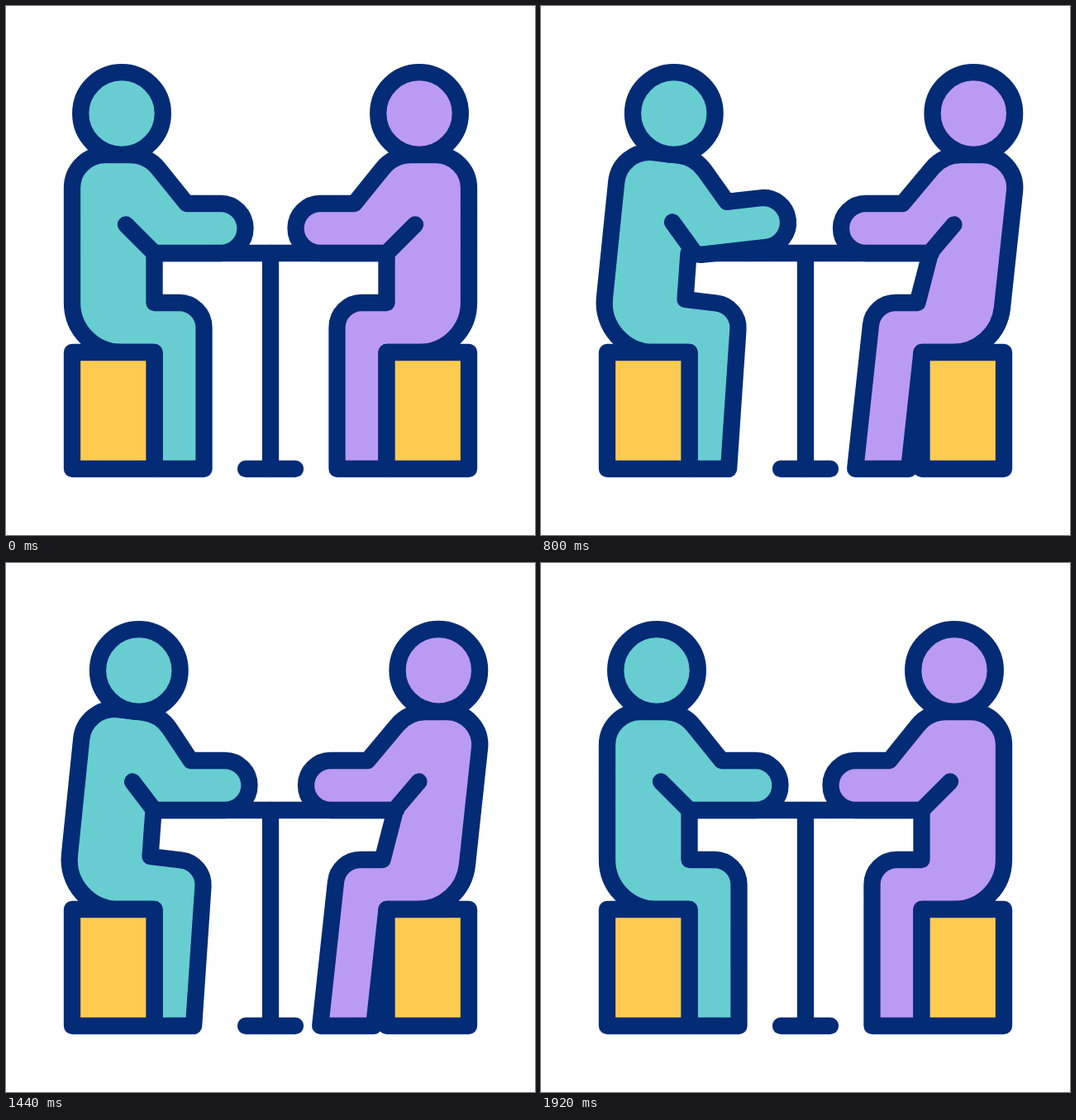
An HTML page with a canvas for the animation above (2000 ms loop, 640 by 640 pixels).

```html
<!DOCTYPE html>
<html lang="en">
<head>
<meta charset="utf-8">
<title>Table talk</title>
<style>
html, body { margin: 0; width: 100%; height: 100%; overflow: hidden; background: #fff; }
canvas { display: block; width: 640px; height: 640px; }
</style>
</head>
<body>
<canvas id="stage"></canvas>
<script>
const SIZE = 640, LOOP = 2000, STEP = 40;
const NAVY = '#032b76', TEAL = '#67cdd1', LILAC = '#bb9af3', YELLOW = '#fecb50';

// Key lines of a sitter facing right
const BACK = 80, FRONT = 179.5, KNEE = 239.5;
const TOP = 180, DESK = 299, LAP = 359, SEAT = 419, FLOOR = 560;
const HAND = 30;

// How far each part moves in a full lean: slopes for lean, tilt and swing, pixels for the rest
const FORWARD = { lean: 0.105, pivot: 326, tilt: 0.115, swing: -0.066,
                  reach: 5, stretch: 0, waist: -1, lap: -5, elbow: 8 };
const RECLINE = { lean: -0.107, pivot: 346, tilt: 0, swing: 0.108,
                  reach: -12.5, stretch: 3.5, waist: -10.5, lap: 5, elbow: -4.5 };

const canvas = document.getElementById('stage');
const ctx = canvas.getContext('2d');
const dpr = window.devicePixelRatio || 1;
canvas.width = canvas.height = SIZE * dpr;

const clamp = u => Math.min(1, Math.max(0, u));
const ease = (t, from, to) => (1 - Math.cos(Math.PI * clamp((t - from) / (to - from)))) / 2;

function paint(fill) {
  ctx.fillStyle = fill;
  ctx.fill();
  ctx.stroke();
}

function line(...points) {
  ctx.beginPath();
  points.forEach(([x, y]) => ctx.lineTo(x, y));
  ctx.stroke();
}

// Closed outline of [x, y, radius] corners
function outline(points) {
  const [a, z] = [points[0], points[points.length - 1]];
  const mid = [(a[0] + z[0]) / 2, (a[1] + z[1]) / 2];
  ctx.beginPath();
  ctx.moveTo(...mid);
  points.forEach(([x, y, r], i) => {
    const [nx, ny] = points[i + 1] || mid;
    if (r) ctx.arcTo(x, y, nx, ny, r);
    else ctx.lineTo(x, y);
  });
  ctx.closePath();
}

// k: amount of the move, lift: raised forearm, nod: head offset
function sitter(move, k, color, lift = 0, nod = 0) {
  const shear = y => k * move.lean * (move.pivot - y);
  const torso = (x, y, r) => [x + shear(y), y + k * move.tilt * (x - 145), r];
  const thigh = (x, dx) => [x + dx, LAP + k * move.tilt * 1.15 * (x - 210)];
  const leg = (x, y) => x + k * move.swing * (y - 372);

  // Points along and across the forearm, measured from the palm
  const angle = -0.115 * lift;
  const [ux, uy] = [Math.cos(angle), Math.sin(angle)];
  const palm = [259.5 + k * move.reach + 4.5 * lift, 269 - 7 * lift];
  const arm = (along, side, r) => [
    palm[0] + ux * along + uy * HAND * side,
    palm[1] + uy * along - ux * HAND * side, r
  ];
  const waist = FRONT + k * move.waist;
  const calf = move.swing > 0 ? leg(FRONT, FLOOR) - 5 * k : FRONT;

  outline([
    torso(BACK, TOP, 40),
    torso(171, TOP, 45),
    arm(-41 - k * move.stretch, 1),
    arm(HAND, 1, HAND - 0.1),
    arm(HAND, -1, HAND - 0.1),
    arm(-79, -1),
    [waist, DESK],
    thigh(FRONT, k * move.lap),
    [...thigh(KNEE, leg(KNEE, LAP) - KNEE), 30],
    [leg(KNEE, FLOOR), FLOOR],
    [calf, FLOOR],
    [FRONT, SEAT],
    [BACK + shear(SEAT), SEAT, 60]
  ]);
  paint(color);
  line([waist + 7 * lift, DESK - k], [145 + k * move.elbow + 6 * lift, 264.5 - 3 * lift]);

  ctx.beginPath();
  ctx.arc(140 + shear(128), 130 + nod, 49.8, 0, Math.PI * 2);
  paint(color);

  ctx.beginPath();
  ctx.rect(BACK, SEAT, FRONT - BACK, FLOOR - SEAT);
  paint(YELLOW);
}

function table() {
  line([FRONT, DESK], [SIZE - FRONT, DESK]);
  line([320, DESK], [320, FLOOR]);
  line([290, FLOOR], [350, FLOOR]);
}

function draw(t) {
  const settle = 1 - ease(t, 1475, 1925);
  const lean = ease(t, 75, 325) * settle;
  const recline = ease(t, 70, 610) * settle;
  const swell = 0.2 * Math.sin(Math.PI * clamp((t - 800) / 400));
  const lift = ease(t, 600, 810) * (1 - ease(t, 1100, 1440)) + swell;
  const nod = -1.7 * ease(t, 900, 1240) * (1 - ease(t, 1240, 1500));

  ctx.setTransform(dpr, 0, 0, dpr, 0, 0);
  ctx.fillStyle = '#fff';
  ctx.fillRect(0, 0, SIZE, SIZE);
  ctx.strokeStyle = NAVY;
  ctx.lineWidth = 20.3;
  ctx.lineCap = ctx.lineJoin = 'round';

  table();
  sitter(FORWARD, lean, TEAL, lift);
  ctx.translate(SIZE, 0);
  ctx.scale(-1, 1);
  sitter(RECLINE, recline, LILAC, 0, nod);
}

const start = performance.now();
function tick() {
  const t = (performance.now() - start) % LOOP;
  draw(Math.floor(t / STEP) * STEP);
  requestAnimationFrame(tick);
}
tick();
</script>
</body>
</html>
```
